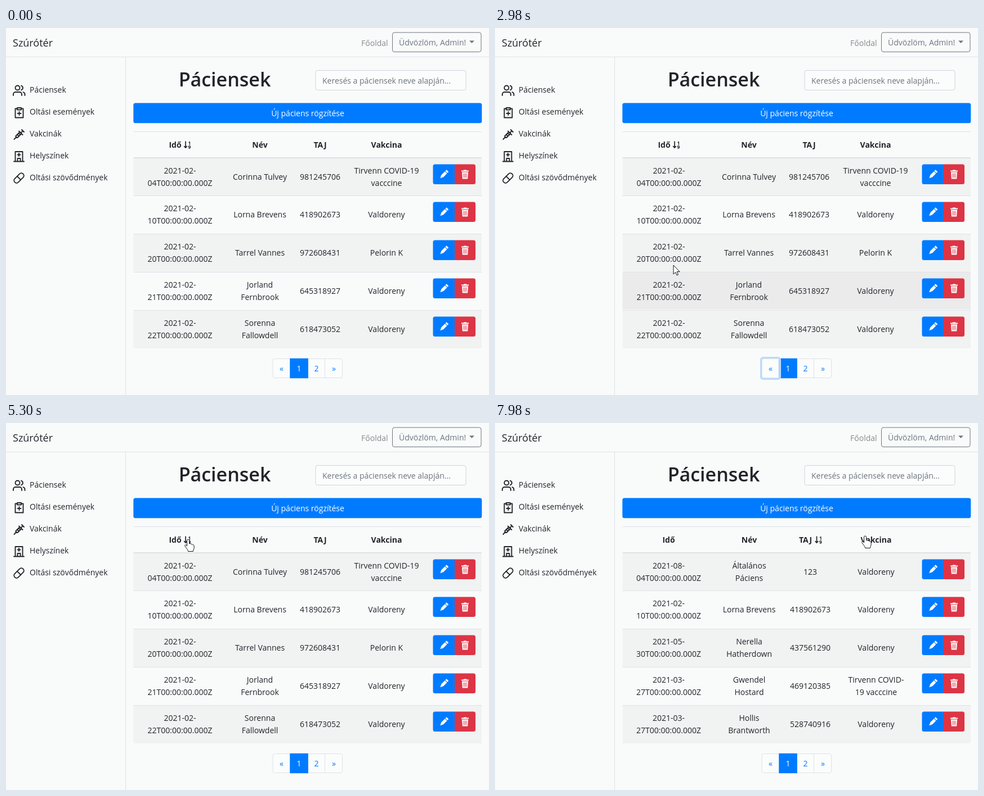
An HTML page that plays this animation: 858 by 653 pixels, repeating every 8000 ms.

```html
<!DOCTYPE html>
<html lang="hu">
<head>
<meta charset="utf-8">
<title>Páciensek</title>
<style>
  html, body { margin: 0; height: 100%; overflow: hidden; background: #f9fbfb; }
  svg { display: block; }
  text { font: 14px "Open Sans", "Noto Sans", sans-serif; fill: #212529; }
  .mid { text-anchor: middle; }
  .bold { font-weight: 700; }
  .brand { font-size: 18px; }
  .title { font-size: 34px; font-weight: 600; }
  .muted { fill: #6c757d; }
  .faint { fill: #868a8d; }
  .white { fill: #fff; }
  .link { fill: #007bff; }
  .digit { font-size: 8.5px; font-weight: 700; }
  .line { stroke: #dee2e6; fill: none; }
  .icon { stroke: #212529; stroke-width: 1.9; fill: none; stroke-linecap: round; stroke-linejoin: round; }
</style>
</head>
<body>
<svg width="858" height="653" viewBox="0 0 858 653">
  <defs>
    <g id="actions">
      <path d="M797 0h-35a3.500 3.500 0 0 0-3.500 3.500v28.500a3.500 3.500 0 0 0 3.500 3.500h35z" fill="#007bff"/>
      <path d="M797 0h33.500a3.500 3.500 0 0 1 3.500 3.500v28.500a3.500 3.500 0 0 1-3.500 3.500h-33.500z" fill="#dc3545"/>
      <path transform="translate(778 18) rotate(45)" d="M-2.600-5h5.200v9l-2.600 5.500l-2.600-5.500zM-2.600-9h5.200v3h-5.200z" fill="#fff"/>
      <g transform="translate(815.500 18)">
        <path d="M-6.500-7h4v-1h5v1h4v2h-13zM-5.500-4h11l-.8 12h-9.400z" fill="#fff"/>
        <path d="M-2.500-2v8M0-2v8M2.500-2v8" stroke="#dc3545"/>
      </g>
    </g>
  </defs>

  <path class="line" d="M0 51.500H858M212.500 52V653M226.500 184.500H845"/>
  <text class="brand" x="12" y="33">Szúrótér</text>
  <text class="faint" x="631" y="32">Főoldal</text>
  <rect x="686.500" y="8" width="157.500" height="34.500" rx="3.500" fill="none" stroke="#6c757d"/>
  <text class="muted" x="698" y="31">Üdvözlöm, Admin!</text>
  <path d="M823 22.500h9l-4.500 4.500z" fill="#6c757d"/>

  <g class="icon">
    <circle cx="20.500" cy="106.500" r="4"/>
    <path d="M13 120v-2a4 4 0 0 1 4-4h7a4 4 0 0 1 4 4v2M27 102.700a4 4 0 0 1 0 7.700M33.500 120v-2a4 4 0 0 0-3-3.800"/>
    <path d="M19.500 143.500h-3v16h14v-16h-3M20 142h7v3.500h-7zM23.500 149v6M20.500 152h6"/>
    <path d="M14.500 198l4-4M28 181l4 4M30 183l-3.500 3.500M23 183.500l6.500 6.500M24.500 185l-7 7v3h3l7-7M20 189.500l2 2M22.500 187l2 2"/>
    <path d="M14 237.500h18M16.500 237v-17h13v17M20.500 237v-5h5v5M23 223v5M20.500 225.500h5"/>
    <g transform="translate(23 267) rotate(-45)"><rect x="-10.500" y="-4.500" width="21" height="9" rx="4.500"/><path d="M0-4.500v9"/></g>
  </g>
  <text x="42" y="115">Páciensek</text>
  <text x="42" y="154">Oltási események</text>
  <text x="42" y="193">Vakcinák</text>
  <text x="42" y="232">Helyszínek</text>
  <text x="42" y="271">Oltási szövődmények</text>

  <text class="title mid" x="388.500" y="104">Páciensek</text>
  <rect x="550" y="75.500" width="267" height="35" rx="3.500" fill="#fbfcfc" stroke="#ced4da"/>
  <text class="muted" x="562" y="99">Keresés a páciensek neve alapján...</text>
  <rect x="226.300" y="133.600" width="619" height="35.600" rx="3.500" fill="#007bff"/>
  <text class="white mid" x="536" y="157">Új páciens rögzítése</text>

  <g id="table"></g>
  <g id="pager"></g>
  <path id="cursor" fill="#fff" stroke="#111" stroke-linejoin="round"/>
</svg>

<script>
const LOOP = 8000, STEP = 40, ROW = 67.75, TOP = 231;
const JAB = 'Tirvenn COVID-19 vacccine', SHOT = 'Valdoreny';

const people = [
  ['02-04', 'Corinna Tulvey', '981245706', JAB],
  ['02-10', 'Lorna Brevens', '418902673', SHOT],
  ['02-20', 'Tarrel Vannes', '972608431', 'Pelorin K'],
  ['02-21', 'Jorland Fernbrook', '645318927', SHOT],
  ['02-22', 'Sorenna Fallowdell', '618473052', SHOT],
  ['03-27', 'Gwendel Hostard', '469120385', JAB],
  ['03-27', 'Hollis Brantworth', '528740916', SHOT],
  ['04-20', 'Ettie Crandock', '805936142', JAB],
  ['05-30', 'Nerella Hatherdown', '437561290', SHOT],
  ['08-04', 'Általános Páciens', '123', SHOT],
];

// Column centres, and the longest name that stays on one line
const wide = { cols: [309, 451, 558, 676], limit: 15 };
const narrow = { cols: [308.5, 451.5, 560, 677], limit: 13 };
const roomy = { cols: [322, 490, 610, 702], limit: 17 };

const firstPage = { ...wide, rows: [0, 1, 2, 3, 4], sort: 0, marks: '19', page: 1 };
const views = [
  [0, firstPage],
  [1100, { ...narrow, rows: [5, 6, 7, 8, 9], sort: 0, marks: '19', page: 2 }],
  [2420, firstPage],
  [4220, { ...narrow, rows: [9, 8, 7, 5, 6], sort: 0, marks: '91', page: 1 }],
  [4740, firstPage],
  [6100, { ...roomy, rows: [2, 4, 8, 1, 3], sort: 1, marks: 'ZA', page: 1 }],
  [7340, { ...narrow, rows: [9, 1, 8, 5, 6], sort: 2, marks: '19', page: 1 }],
];

// Pointer path: time, x, y
const path = [
  [0, 316, 660], [99, 316, 660], [100, 316, 650], [500, 316, 650], [700, 430, 633], [940, 558, 607],
  [1380, 558, 607], [1420, 557, 606], [1620, 489, 607], [2640, 489, 606], [2980, 317, 422],
  [3180, 297, 222], [3260, 296, 216], [3700, 309, 212], [5260, 309, 212], [5300, 324, 207],
  [5500, 324, 207], [5700, 400, 204], [5860, 463, 206], [5940, 453, 207], [6380, 453, 207],
  [6420, 463, 207], [6740, 463, 207], [6780, 490, 207], [7060, 617, 199], [7660, 617, 199],
  [7700, 626, 200], [7940, 626, 200], [7980, 658, 201], [LOOP, 658, 201],
];

const ARROW = 'M0 0v16l3.700-3.500l2.400 5.500l2.400-1l-2.400-5.400h5z';
const HAND = 'M-2.500 2a2 2 0 0 1 4 0v6c1-1 3-.7 3.300.7c1.200-.7 2.800 0 3 1.200c1.200-.4 2.300.3 2.300 1.800v3.600' +
  'c0 2-1.600 3.500-1.800 6.200h-8.600c-.3-2.500-2-4-3.500-6.200l-2.300-3.500c-.8-1.600 1.200-2.800 2.400-1.500l1.200 1.600z';

const [table, pager, cursor] = ['table', 'pager', 'cursor'].map(id => document.getElementById(id));
const clamp = v => Math.min(1, Math.max(0, v));
const text = (x, y, s, cls = 'mid') => `<text class="${cls}" x="${x}" y="${y}">${s}</text>`;
const rect = (x, y, w, h, fill, extra = '') =>
  `<rect x="${x}" y="${y}" width="${w}" height="${h}" fill="${fill}" ${extra}/>`;

function pointerAt(t) {
  const i = Math.max(1, path.findIndex(p => p[0] >= t));
  const [a, b] = [path[i - 1], path[i]];
  const k = clamp((t - a[0]) / (b[0] - a[0]));
  return [a[1] + (b[1] - a[1]) * k, a[2] + (b[2] - a[2]) * k];
}

function cell(x, y, lines) {
  return lines.map((s, i) => text(x, y + (i * 2 - lines.length + 1) * 11, s)).join('');
}

function vaccineLines(name, limit) {
  if (name !== JAB) return [name];
  const cut = name.indexOf('19') + (limit === wide.limit ? 2 : 0);
  return [name.slice(0, cut), name.slice(cut).trim()];
}

function sortIcon(x, [upper, lower]) {
  return `<path d="M${x + 3.5} 201.500v11.500m-2.800-2.800l2.800 2.800l2.800-2.800" fill="none" stroke="#212529" stroke-width="1.700"/>` +
    text(x + 10.5, 207.5, upper, 'mid digit') + text(x + 10.5, 214.5, lower, 'mid digit');
}

function drawTable({ cols, limit, rows, sort, marks }, hover) {
  let out = '';
  ['Idő', 'Név', 'TAJ', 'Vakcina'].forEach((label, i) => {
    out += text(cols[i] - (i === sort ? 8.5 : 0), 213, label, 'mid bold');
  });
  out += sortIcon(cols[sort] + [6.5, 9, 8][sort], marks);
  rows.forEach((id, i) => {
    const [date, name, taj, vaccine] = people[id];
    const [month, day] = date.split('-');
    const offset = Math.floor(i * ROW), y = 270 + offset;
    const fill = i === hover ? '#ebebec' : i % 2 ? 'none' : '#f1f2f2';
    out += rect(226.5, TOP + offset, 618.5, i % 2 ? 67 : 68, fill);
    out += rect(226.5, 230 + offset + (i ? 1 : 0), 618.5, i ? 1 : 2, '#dee2e6');
    out += cell(cols[0], y, [`2021-${month}-`, `${day}T00:00:00.000Z`]);
    out += cell(cols[1], y, name.length > limit ? name.split(' ') : [name]);
    out += cell(cols[2], y, [taj]);
    out += cell(cols[3], y, vaccineLines(vaccine, limit));
    out += `<use href="#actions" y="${242.5 + offset}"/>`;
  });
  return out;
}

function drawPager(page, hover, ring) {
  const back = hover === 0 ? '#e9ecef' : '#fbfcfc';
  let out = rect(474, 588.5, 123.5, 34, '#fbfcfc', 'rx="3.500"');
  if (hover >= 0) out += rect(474 + hover * 31, 589, 31, 33, '#e9ecef');
  out += rect(474, 588.5, 123.5, 34, 'none', 'rx="3.500" class="line"');
  out += '<path class="line" d="M504.500 589v33M536.500 589v33M566.500 589v33"/>';
  out += rect(page === 1 ? 504.3 : 535.7, 587.8, page === 1 ? 32.5 : 31.5, 35.4, '#007bff');
  if (ring) {
    out += rect(474, 588.5, 31, 34, back, 'rx="2" class="line"');
    out += rect(472.5, 586.5, 34, 38, 'none', `rx="4" stroke="#bcdafc" stroke-width="3" opacity="${ring}"`);
  }
  ['«', '1', '2', '»'].forEach((s, i) => {
    out += text(489.5 + i * 31, 611, s, i === page ? 'mid white' : 'mid link');
  });
  return out;
}

let lastTable, lastPager;
function draw(now) {
  const t = Math.max(0, Math.floor((now % LOOP - 20) / STEP) * STEP + 20);
  const view = views.filter(v => v[0] <= t).pop()[1];
  const [x, y] = pointerAt(t);

  // Row highlight trails the pointer by one step
  const row = Math.floor((pointerAt(t - STEP)[1] - TOP) / ROW);
  const overPager = x > 474 && x < 598 && y > 588 && y < 623;
  const item = overPager ? Math.floor((x - 474) / 31) : -1;
  const ring = clamp((t - 1580) / 160) - clamp((t - 3740) / 160);

  const tableKey = [views.findIndex(v => v[1] === view), row >= 0 && row < 5 ? row : -1].join();
  if (tableKey !== lastTable) table.innerHTML = drawTable(view, row);
  lastTable = tableKey;

  const pagerKey = [view.page, item, ring].join();
  if (pagerKey !== lastPager) pager.innerHTML = drawPager(view.page, item, ring);
  lastPager = pagerKey;

  cursor.setAttribute('d', overPager || (y > 195 && y < 228) ? HAND : ARROW);
  cursor.setAttribute('transform', `translate(${Math.round(x)} ${Math.round(y)})`);
}

const start = performance.now();
function tick() {
  draw(performance.now() - start);
  requestAnimationFrame(tick);
}
tick();
</script>
</body>
</html>
```
